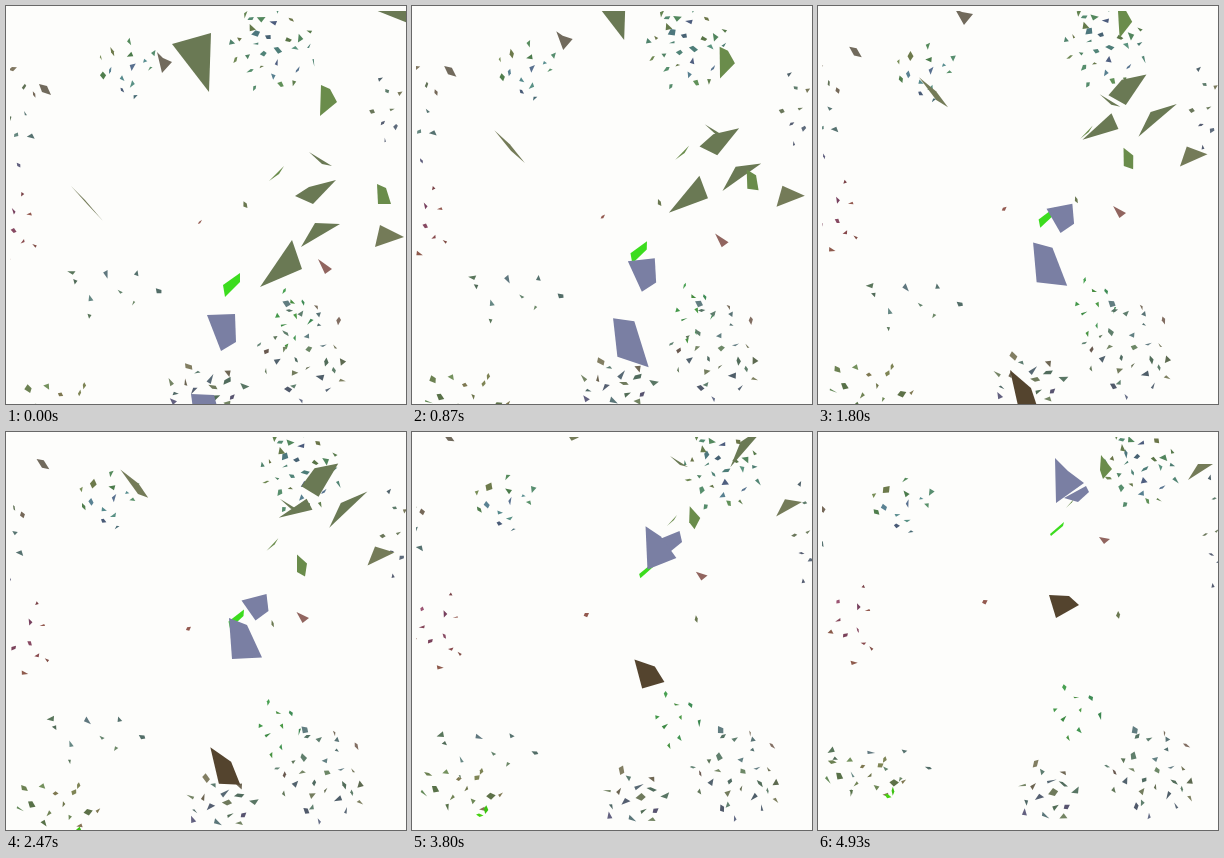
These frames come from a looping animation (400 px wide and 398 px high, 4.99 s). An HTML page with a canvas:

```html
<!DOCTYPE html>
<html lang="en">
<head>
<meta charset="utf-8">
<title>Drifting shards</title>
<style>
  html, body { margin: 0; width: 100%; height: 100%; overflow: hidden; background: #fdfdfb; }
  canvas { display: block; width: 100%; height: 100%; }
</style>
</head>
<body>
<canvas id="stage" width="400" height="398"></canvas>
<script>
const ctx = document.getElementById('stage').getContext('2d');
const LOOP = 4990, STEP = 1000 / 15, LAST = 74;
const GREEN = '#6a7954', LEAF = '#6a8c4b', KHAKI = '#747b58', SLATE = '#7a7fa3';
const shards = [], chips = [];

let seed = 41;
function rnd(a, b) {
  seed = (seed * 16807) % 2147483647;
  return a + (b - a) * seed / 2147483647;
}
const mix = (a, b, s) => a + (b - a) * s;

// A large shard passes two poses at times t0 and t1 (loop = 1), on a path bowed by bend.
function shard(color, from, to, { t0 = 0, t1 = 1, bend = [0, 0] } = {}) {
  shards.push({ color, from, to, t0, t1, bend });
}

// Small chips scattered evenly over an ellipse [x, y, rx, ry] that drifts and reshapes.
function swarm(count, [hueLo, hueHi, sat], from, to, { size = 4, power = 1 } = {}) {
  for (let i = 0; i < count; i++) {
    const a = i * 2.4 + rnd(-0.4, 0.4), r = Math.sqrt((i + 0.5) / count);
    const ox = r * Math.cos(a), oy = r * Math.sin(a);
    const place = ([x, y, rx, ry]) => [x + ox * rx, y + oy * ry];
    const sides = rnd(0, 1) < 0.65 ? 3 : 4, scale = size * rnd(0.75, 1.25);
    const corners = Array.from({ length: sides }, (_, k) => {
      const t = (k + rnd(-0.25, 0.25)) / sides * 2 * Math.PI;
      return [scale * Math.cos(t), scale * Math.sin(t)];
    });
    chips.push({
      from: place(from), to: place(to), power, corners,
      color: `hsl(${rnd(hueLo, hueHi)}, ${sat}%, ${rnd(36, 47)}%)`,
      turn: rnd(0, 6.28), spin: rnd(-1.5, 1.5), tilt: rnd(0, 3.14), roll: rnd(-2, 2)
    });
  }
}

// Hue range and saturation
const MOSS = [45, 120, 20], COOL = [70, 225, 24], DUSK = [20, 250, 14], RED = [325, 375, 30];
const LIME = [100, 110, 85], FERN = [110, 145, 38], SAND = [25, 110, 22];

swarm(14, COOL, [121, 63, 30, 32], [84, 74, 32, 30]);
swarm(30, COOL, [266, 43, 44, 45], [322, 36, 38, 42]);
swarm(8, DUSK, [381, 104, 20, 34], [396, 100, 12, 60], { size: 3.2 });
swarm(8, DUSK, [15, 110, 18, 55], [-4, 95, 12, 45]);
swarm(11, RED, [0, 222, 38, 38], [35, 195, 24, 46], { size: 3.5 });
swarm(9, DUSK, [102, 285, 52, 32], [54, 336, 58, 30], { power: 1.35 });
swarm(14, SAND, [55, 402, 45, 32], [45, 345, 42, 25]);
swarm(2, LIME, [67, 440, 8, 20], [73, 360, 4, 12], { size: 4.6 });
swarm(9, FERN, [285, 313, 20, 33], [256, 281, 28, 30]);
swarm(30, DUSK, [297, 345, 48, 52], [333, 340, 48, 46]);
swarm(16, DUSK, [200, 382, 42, 24], [230, 362, 30, 34], { size: 4.5 });
swarm(1, RED, [194, 216, 0, 0], [167, 170, 0, 0], { size: 3, power: 1.25 });
swarm(1, MOSS, [239, 199, 0, 0], [300, 183, 0, 0], { size: 3.5, power: 1.15 });

shard(GREEN, [166,38, 205,27, 203,86], [185,-70, 224,-81, 222,-22], { t1: 0.365 });
shard(LEAF, [315,79, 324,83, 331,96, 314,110], [294,-30, 301,-26, 308,-14, 297,3], { t1: 0.5 });
shard(GREEN, [364,2, 410,-8, 402,17], [360,-40, 405,-50, 398,-22], { t1: 0.2 });
shard(GREEN, [303,146, 326,160, 316,158], [258,24, 276,35, 268,33], { t1: 0.77 });
shard(GREEN, [289,190, 303,181, 330,174, 307,198], [301,27, 314,7, 337,3, 318,38],
  { t1: 0.608, bend: [-6, -3] });
shard(GREEN, [295,241, 309,217, 334,218], [323,70, 334,45, 361,31], { t1: 0.608, bend: [9, -8] });
shard(GREEN, [254,281, 286,234, 296,263], [281,50, 308,37, 313,44], { t1: 0.608, bend: [-6, -9] });
shard(LEAF, [263,175, 278,160, 273,168], [255,94, 265,83, 262,88], { t1: 0.77, bend: [3, -4] });
shard(LEAF, [371,178, 380,182, 385,198, 372,198], [283,23, 294,37, 285,47, 282,38], { bend: [-36, 22] });
shard(KHAKI, [374,219, 398,231, 369,241], [380,32, 395,32, 370,48], { bend: [-8, -11] });
shard('#91655f', [312,253, 326,263, 319,268], [281,105, 292,107, 286,112], { bend: [-6, 1] });
shard('#3cdc1e', [217,279, 234,267, 234,276, 219,291], [232,102, 246,90, 245,94, 233,104], { bend: [-2, -1] });
shard(SLATE, [201,309, 229,308, 230,336, 215,345], [246,66, 268,54, 271,60, 260,70], { bend: [12, -19] });
shard(SLATE, [185,388, 208,389, 222,442, 190,425], [237,26, 250,39, 266,51, 238,71], { bend: [12, -21] });
shard('#54442e', [192,364, 213,382, 222,409, 201,404], [231,163, 251,164, 261,173, 238,186],
  { t0: 0.365, bend: [6, -9] });
shard(KHAKI, [65,180, 79,194, 97,215, 81,198], [125,13, 144,27, 152,40, 143,39], { t1: 0.608, bend: [0, -9] });
shard('#716a5c', [33,78, 41,80, 45,89, 36,86], [30,16, 37,17, 43,26, 36,25], { t1: 0.608 });
shard('#716a5c', [151,46, 157,52, 166,56, 156,67], [137,3, 144,6, 155,8, 146,19], { t1: 0.365 });

function fillPoly(color, points) {
  ctx.fillStyle = color;
  ctx.beginPath();
  points.forEach(([x, y]) => ctx.lineTo(x, y));
  ctx.fill();
}

function drawShard({ color, from, to, t0, t1, bend }, u) {
  const s = (u - t0) / (t1 - t0), bow = 4 * s * (1 - s);
  const at = i => mix(from[i], to[i], s) + bow * bend[i % 2];
  const points = [];
  for (let i = 0; i < from.length; i += 2) points.push([at(i), at(i + 1)]);
  fillPoly(color, points);
}

function drawChip(c, u) {
  const p = u ** c.power;
  const x = mix(c.from[0], c.to[0], p), y = mix(c.from[1], c.to[1], p);
  const flat = 0.3 + 0.5 * Math.abs(Math.cos(c.tilt + c.roll * u));
  const a = c.turn + c.spin * u, cos = Math.cos(a), sin = Math.sin(a);
  fillPoly(c.color, c.corners.map(([px, py]) => [
    x + px * cos - py * flat * sin,
    y + px * sin + py * flat * cos
  ]));
}

function draw(time) {
  const u = Math.min(LAST, Math.floor((time % LOOP + 4) / STEP)) / LAST;
  ctx.fillStyle = '#fdfdfb';
  ctx.fillRect(0, 0, 400, 398);
  ctx.save();
  ctx.beginPath();
  ctx.rect(4, 5, 396, 393);
  ctx.clip();
  chips.forEach(c => drawChip(c, u));
  shards.forEach(s => drawShard(s, u));
  ctx.restore();
}

const start = performance.now();
function tick() {
  draw(performance.now() - start);
  requestAnimationFrame(tick);
}
tick();
</script>
</body>
</html>
```
